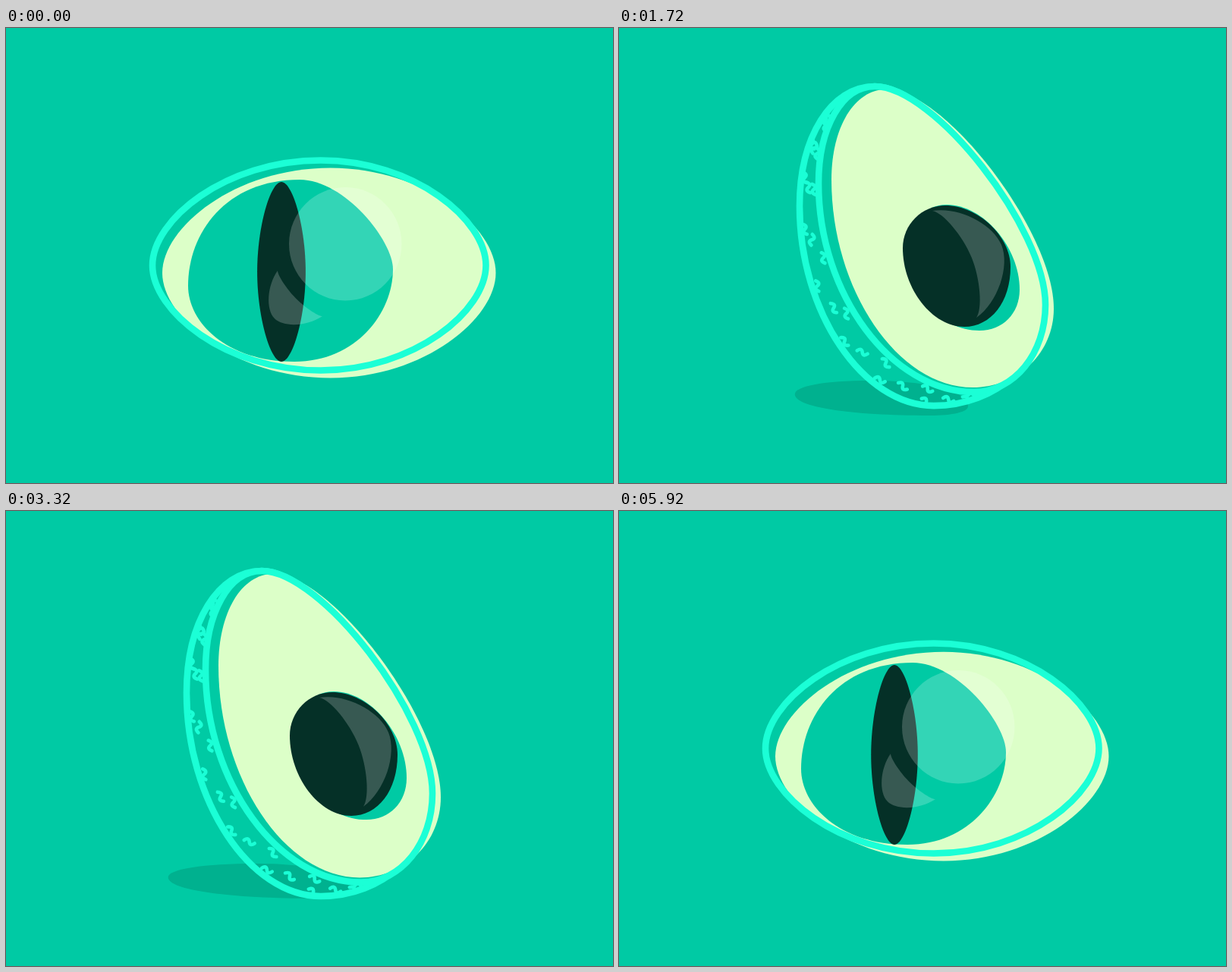
Animation of 800x600 px, one loop 5960 ms. Source, as an HTML page with a canvas:

```html
<!DOCTYPE html>
<html lang="en">
<head>
<meta charset="utf-8">
<title>Eye and avocado</title>
<style>
html, body { margin: 0; width: 100%; height: 100%; overflow: hidden; background: #00caa4; }
canvas { display: block; width: 800px; height: 600px; }
</style>
</head>
<body>
<canvas id="stage" width="800" height="600"></canvas>
<script>
const LOOP = 5960;
const BG = '#00caa4', LINE = '#1bffd6', FLESH = '#dcffc8', DARK = '#053027', SHADE = '#00b18f';
const c = document.getElementById('stage').getContext('2d');
c.lineCap = c.lineJoin = 'round';

// ---- Timing ----
const ramp = (t, a, b) => Math.max(0, Math.min(1, (t - a) / (b - a)));
const lerp = (a, b, v) => a + (b - a) * v;
const smooth = v => v * v * (3 - 2 * v);
const inOut = v => v < .5 ? 4 * v ** 3 : 1 - (2 - 2 * v) ** 3 / 2;
const out = (v, power) => 1 - (1 - v) ** power;

// ---- Paths: four cubic segments, clockwise from the top ----
const mix = (p, q, v) => p.map((n, i) => lerp(n, q[i], v));
const mapXY = (p, fx, fy) => p.map((n, i) => i % 2 ? fy(n) : fx(n));
const shift = (p, dx, dy) => mapXY(p, x => x + dx, y => y + dy);
const scale = (p, cx, cy, sx, sy) => mapXY(p, x => cx + (x - cx) * sx, y => cy + (y - cy) * sy);

// A closed curve touching its box at tx, ry, bx, ly; k is the roundness of each corner.
function blob([l, r, t, b], [tx, ry, bx, ly], k, lean = 0) {
  const h = k.map(n => n + lean), v = k.map(n => n - lean);
  return [
    tx, t, lerp(tx, r, h[0]), t, r, lerp(ry, t, v[0]),
    r, ry, r, lerp(ry, b, v[1]), lerp(bx, r, h[1]), b,
    bx, b, lerp(bx, l, h[2]), b, l, lerp(ly, b, v[2]),
    l, ly, l, lerp(ly, t, v[3]), lerp(tx, l, h[3]), t];
}
function oval(box, k, lean, dx = 0) {
  const x = (box[0] + box[1]) / 2 + dx, y = (box[2] + box[3]) / 2;
  return blob(box, [x, y, x, y], Array(4).fill(k), lean);
}
const eye = (...box) => oval(box, .5, .07, 2);

// A bow between two tips; the bulges are fractions of its length.
function crescent(x0, y0, x1, y1, far, near) {
  const dx = x1 - x0, dy = y1 - y0;
  const at = (along, side) => [x0 + dx * along + dy * side, y0 + dy * along - dx * side];
  return [[0, 0], [.05, far / 2], [.3, far], [.5, far], [.7, far], [.95, far / 2],
          [1, 0], [.95, near / 2], [.7, near], [.5, near], [.3, near], [.05, near / 2]]
    .flatMap(([a, s]) => at(a, s));
}
function fit(p, [l, r, t, b]) {
  const xs = p.filter((_, i) => i % 6 === 0), ys = p.filter((_, i) => i % 6 === 1);
  const x0 = Math.min(...xs), x1 = Math.max(...xs), y0 = Math.min(...ys), y1 = Math.max(...ys);
  return mapXY(p, x => lerp(l, r, (x - x0) / (x1 - x0)), y => lerp(t, b, (y - y0) / (y1 - y0)));
}

// ---- Shapes: resting eye, looking right, avocado, shrunken avocado ----
const EGG = [.35, .56, .53, .58], PIT = [.5, .58, .52, .55];
const eyeRest = eye(193, 632.5, 174.5, 451.5);
const eyeWide = eye(187, 638, 180.5, 445);
const eyeDrawn = eye(183, 641, 185, 441);
const accents = [eye(163, 661, 175, 451), eye(203, 621, 195, 431)];

const poses = (rest, wide, ripe, box) => [rest, wide, ripe, fit(ripe, box)];
const TINY = [429, 528, 253, 359];
const rim = poses(eyeRest, eyeWide, blob([263, 562, 77, 480], [337, 365, 468, 205], EGG), TINY);
const skin = [eyeRest, eyeWide, blob([238, 562, 77, 498], [337, 365, 415, 235], EGG), rim[3]];
const flesh = poses(shift(eyeRest, 13, 10), shift(eyeWide, 13.5, 9.5),
  blob([280, 573, 81, 474], [352, 370, 466, 200], EGG), [444, 516, 257, 349]);
const iris = blob([240, 510, 200, 440], [387, 318, 380, 340], [.4, .55, .56, .58], .08);
const hole = poses(iris, fit(iris, [314, 609, 207, 419]),
  blob([376, 528, 233, 399], [432, 345, 475, 295], PIT), [459, 509, 286, 330]);
const seed = poses(oval([331.5, 394.5, 203, 440], .48, -.02), oval([433, 543, 215.5, 412], .38, -.13),
  blob([374, 516, 234, 394], [430, 315, 455, 290], PIT), [469, 507, 287, 326]);
const disc = oval([373, 521.5, 210, 359.5], .552, 0);
const shine = poses(disc, disc, crescent(413, 241, 471, 382, .44, .16), [485, 500, 288, 320]);
const glint = crescent(358, 320, 417, 380, -.56, -.1);

// ---- Drawing ----
const white = a => `rgba(255,255,255,${a})`;
function path(p) {
  c.beginPath();
  c.moveTo(p[0], p[1]);
  for (let i = 2; i < 24; i += 6)
    c.bezierCurveTo(p[i], p[i + 1], p[i + 2], p[i + 3], p[(i + 4) % 24], p[(i + 5) % 24]);
  c.closePath();
}
function fill(p, color) { path(p); c.fillStyle = color; c.fill(); }
function stroke(p, width) { path(p); c.strokeStyle = LINE; c.lineWidth = width; c.stroke(); }

// u counts segments clockwise from the top and may be negative.
function pointAt(p, u) {
  u = ((u % 4) + 4) % 4;
  const k = Math.floor(u), t = u - k, s = 1 - t, i = k * 6;
  return [0, 1].map(j => s ** 3 * p[i + j] + 3 * s * s * t * p[i + 2 + j]
    + 3 * s * t * t * p[i + 4 + j] + t ** 3 * p[(i + 6 + j) % 24]);
}
function trace(p, from, to, width) {
  if (from - to < .002) return;
  c.beginPath();
  for (let i = 0; i <= 160; i++) c.lineTo(...pointAt(p, lerp(from, to, i / 160)));
  c.strokeStyle = LINE;
  c.lineWidth = width;
  c.stroke();
}

function drawShadow(t) {
  const size = smooth(ramp(t, 1470, 1680)) * (1 - smooth(ramp(t, 3580, 3740)));
  if (!size) return;
  const sway = Math.exp((2060 - t) / 900) * Math.cos(Math.PI * (t - 2060) / 420);
  const shape = blob([209 - 19 * sway, 460, 465, 511], [330, 499, 410, 483], [.6, .6, .6, .6]);
  fill(scale(shape, 415, 490, size, size), SHADE);
}

function drawSquiggles(outer, inner, size) {
  if (!size) return;
  let state = 7;
  const random = () => (state = state * 16807 % 2147483647) / 2147483647;
  const count = 25;
  c.save();
  path(outer);
  c.clip();
  c.strokeStyle = LINE;
  c.lineWidth = 4.6;
  for (let i = 0; i < count; i++) {
    const u = lerp(1.85, 3.6, (i + random() * .5) / count);
    const a = pointAt(outer, u), b = pointAt(inner, u), v = [.2, .75, .45][i % 3];
    c.save();
    c.translate(lerp(a[0], b[0], v), lerp(a[1], b[1], v));
    c.rotate(lerp(.5, 1.7, ramp(u, 2, 3)) + random() - .5);
    c.scale(size, size);
    c.beginPath();
    c.moveTo(-7, 2);
    c.quadraticCurveTo(-4, -5, 0, 0);
    c.quadraticCurveTo(4, 5, 7, -2);
    c.stroke();
    c.restore();
  }
  c.restore();
}

function drawBody(t) {
  const opening = t > 5000;
  const wide = opening ? 0 : inOut(ramp(t, 800, 1070));
  const ripe = opening ? 0 : inOut(ramp(t, 1180, 1560));
  const small = opening ? 0 : ramp(t, 3600, 3920) ** 2.7;
  const zoom = opening ? 1 : 1 - .96 * ramp(t, 3920, 4060);
  const grow = (a, b) => opening ? smooth(ramp(t, a, b)) : 1;

  // The landing avocado shoots up, then sags and rocks to rest.
  const landed = Math.max(0, t - 1720);
  const sag = ripe * (1 - Math.exp(-landed / 120) * Math.cos(landed / 130));
  const stretch = opening ? 0 : .12 * Math.sin(Math.PI * ramp(t, 1340, 1720));
  const bend = y => 505 - (505 - y - sag * (2 + 8 * (y - 77) / 421)) * (1 + stretch);
  const pose = s => {
    const full = mapXY(mix(mix(s[0], s[1], wide), s[2], ripe), x => x, bend);
    return scale(mix(full, s[3], small), 482, 306, zoom, zoom);
  };

  const front = pose(rim), outer = pose(skin), width = lerp(8.6, 3.3, small) * zoom;
  if (!opening) drawShadow(t);
  if (ripe) {
    const size = smooth(ramp(t, 1480, 1680)) * (1 - ramp(t, 3620, 3760));
    drawSquiggles(outer, front, size);
    stroke(outer, width);
    fill(front, BG);
  }

  // The lid and the pupil keep relaxing across the seam of the loop.
  const relax = out(ramp(t < 800 ? t + LOOP : t, 5900, 6240), 5);
  const calm = opening || t < 800 ? 1 : 1 - wide;
  const settle = calm * (opening || t < 800 ? 2 - 3 * relax : -1);
  const slit = 1 + calm * (opening || t < 800 ? .1 * relax - .05 : .05);
  const inner = pose(flesh), base = inner[13];
  const lid = grow(5480, 5860) * (1 - settle / (base - inner[1]));
  fill(ripe ? inner : scale(inner, 425, base + (323 - base) * (1 - grow(5480, 5860)), 1, lid), FLESH);

  const ball = grow(5540, 5840), core = grow(5620, 5860), light = grow(5640, 5860);
  const pit = pose(seed), mid = (pit[6] + pit[18]) / 2;
  fill(scale(pose(hole), 375, 320, ball, ball), BG);
  fill(scale(pit, mid, 321, core * lerp(slit, 1, ripe), core), DARK);
  fill(scale(pose(shine), 447, 285, light, light), white(.2));
  const glow = lerp(.2, .13, wide) * (1 - ramp(ripe, 0, .4));
  if (glow) fill(scale(shift(glint, -wide, -3 * wide), 375, 362, light, light), white(glow));

  return [front, width];
}

function drawDot(t) {
  const v = smooth(ramp(t, 4040, 4440));
  const [x, y] = pointAt(eyeDrawn, .6);
  const arc = (a, b, d) => lerp(lerp(a, b, v), lerp(b, d, v), v);
  c.beginPath();
  c.arc(arc(482, 560, x), arc(306, 345, y), 4.3, 0, 7);
  c.fillStyle = LINE;
  c.fill();
}

function drawOutline(t) {
  const shape = mix(eyeDrawn, eyeRest, smooth(ramp(t, 5280, 5860)));
  const drawn = 3.65 * out(ramp(t, 4400, 4960), 1.4) + .35 * ramp(t, 4960, 5360) ** 1.5;
  if (drawn < 4) trace(shape, .6, .6 - drawn, 8.6);
  else stroke(shape, 8.6);

  accents.forEach((p, i) => {
    const sweep = [2.53, 1.75][i];
    trace(p, -.62 - sweep * ramp(t, 4870, 5700), -.62 - sweep * ramp(t, 4740, 5360), 2.2);
  });
}

function draw(t) {
  c.fillStyle = BG;
  c.fillRect(0, 0, 800, 600);
  if (t < 4060) stroke(...drawBody(t));
  if (t >= 4030 && t < 4420) drawDot(t);
  if (t > 5480) drawBody(t);
  if (t >= 4400) drawOutline(t);
}

const start = performance.now();
function tick() {
  draw((performance.now() - start) % LOOP);
  requestAnimationFrame(tick);
}
tick();
</script>
</body>
</html>
```
